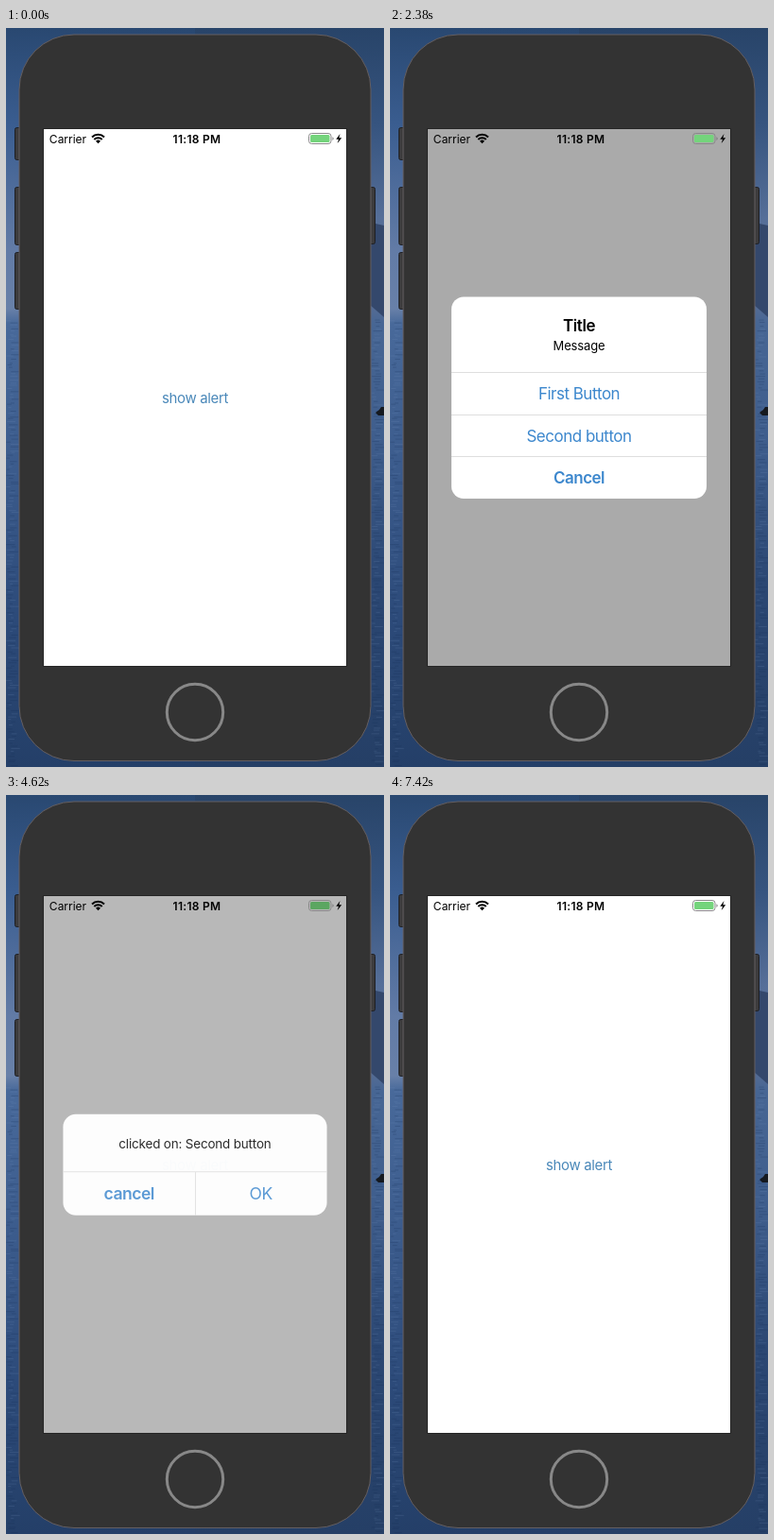
Recreate the animation shown at these times as an HTML page. Size 400 by 782 pixels, loop 7.49 s.

```html
<!DOCTYPE html>
<html lang="en">
<head>
<meta charset="utf-8">
<title>Alert demo</title>
<style>
  html, body { margin: 0; width: 100%; height: 100%; overflow: hidden; background: #333; }
  svg { display: block; width: 100vw; height: 100vh; }
  text { font-family: Inter, "Liberation Sans", sans-serif; text-anchor: middle; }
  .status { font-size: 12px; }
  .link { font-size: 15px; letter-spacing: -.36px; fill: #4a88b9; }
  .title { font-size: 17px; font-weight: 600; letter-spacing: -.4px; }
  .message { font-size: 13px; letter-spacing: -.16px; }
  .action { font-size: 17px; letter-spacing: -.5px; fill: #3c87cd; }
  .bold { font-weight: 600; }
  .rule { stroke: #dedede; stroke-width: 1; }
  .press { fill: #e9e9e9; }
  .key { fill: #3d3c3d; stroke: #1d1e22; }
</style>
</head>
<body>
<svg viewBox="0 0 400 782" preserveAspectRatio="none">
  <defs>
    <linearGradient id="left" x2="0" y2="1">
      <stop offset="0" stop-color="#294871"/>
      <stop offset=".13" stop-color="#3a5d90"/>
      <stop offset=".3" stop-color="#627ba6"/>
      <stop offset=".38" stop-color="#6880a8"/>
      <stop offset=".4" stop-color="#48699a"/>
      <stop offset=".6" stop-color="#3b5b8c"/>
      <stop offset=".8" stop-color="#2c4a79"/>
      <stop offset="1" stop-color="#243f68"/>
    </linearGradient>
    <linearGradient id="right" x2="0" y2="1">
      <stop offset="0" stop-color="#284469"/>
      <stop offset=".13" stop-color="#36547f"/>
      <stop offset=".26" stop-color="#566f99"/>
      <stop offset=".38" stop-color="#536b94"/>
      <stop offset=".4" stop-color="#476694"/>
      <stop offset=".55" stop-color="#3f5e8d"/>
      <stop offset=".75" stop-color="#2b4773"/>
      <stop offset="1" stop-color="#253f66"/>
    </linearGradient>
  </defs>

  <rect width="200" height="782" fill="url(#left)"/>
  <rect x="200" width="200" height="782" fill="url(#right)"/>
  <path d="M384 216L391 207L400 209V306L384 292Z" fill="#34486c"/>
  <g id="water"></g>
  <path d="M391 407L395 404L397 401H400V410H394Z" fill="#15191f"/>

  <g class="key">
    <rect x="9.5" y="105.5" width="8" height="34" rx="2"/>
    <rect x="9.5" y="168.5" width="8" height="61" rx="2"/>
    <rect x="9.5" y="237.5" width="8" height="60" rx="2"/>
    <rect x="382.5" y="168.5" width="8" height="60" rx="2"/>
  </g>
  <rect x="14" y="7" width="372" height="768.5" rx="58" fill="#333" stroke="#645f62"/>
  <circle cx="200" cy="724" r="29.7" fill="none" stroke="#888" stroke-width="3"/>
  <rect x="39.5" y="106.5" width="321" height="569" fill="#fff" stroke="#262626"/>

  <text id="link" class="link" x="200" y="396.5">show alert</text>
  <rect id="dim" x="40" y="107" width="320" height="568" opacity="0"/>

  <text class="status" x="65.5" y="121.5">Carrier</text>
  <text class="status bold" x="202" y="121.5" letter-spacing=".3">11:18 PM</text>
  <g fill="none" stroke="#000" stroke-width="2">
    <path d="M91 115.5A9.2 9.2 0 0 1 104 115.5"/>
    <path d="M93.3 118A5.9 5.9 0 0 1 101.7 118"/>
  </g>
  <path d="M97.5 122.2L95 119.7A3.6 3.6 0 0 1 100 119.7Z"/>
  <rect x="320.5" y="111.5" width="23.5" height="11" rx="3" fill="none" stroke="#898989"/>
  <path d="M345.5 115.3A2 2 0 0 1 345.5 118.9Z" fill="#777"/>
  <rect x="322" y="113" width="20.5" height="8" rx="1.5" fill="#74d47c"/>
  <rect id="shade" x="322" y="113" width="20.5" height="8" rx="1.5" opacity="0"/>
  <path d="M353.5 112L349.3 117.8H352L350.7 122L355.2 116.2H352.4Z"/>

  <g id="choice" opacity="0">
    <rect class="card" x="65" y="284.5" width="270" height="213.5" rx="13" fill="#fff"/>
    <g class="body">
      <rect class="press" x="65" y="409.5" width="270" height="44"/>
      <path class="rule" d="M65 364.5H335M65 409.5H335M65 453.5H335"/>
      <text class="title" x="200" y="320.5">Title</text>
      <text class="message" x="200" y="340.5">Message</text>
      <text class="action" x="200" y="393">First Button</text>
      <text class="action" x="200" y="437.5">Second button</text>
      <text class="action bold" x="200" y="482">Cancel</text>
    </g>
  </g>

  <g id="reply" opacity="0">
    <rect class="card" x="65" y="339.5" width="270" height="103.5" rx="13" fill="#fff"/>
    <g class="body">
      <path class="press" d="M200.5 399H335V430A13 13 0 0 1 322 443H200.5Z"/>
      <path class="rule" fill="none" d="M65 398.5H335M200.5 399V443"/>
      <text class="message" x="200" y="374.5">clicked on: Second button</text>
      <text class="action bold" x="132.5" y="427">cancel</text>
      <text class="action" x="267.3" y="427">OK</text>
    </g>
  </g>
</svg>

<script>
const LOOP = 7490, STEP = 70, OMEGA = 22.8, DIM = 0.333;
const $ = id => document.getElementById(id);
const set = (el, name, value) => el.setAttribute(name, value);
const clamp = x => Math.min(1, Math.max(0, x));

// Critically damped spring: share of the way still to go.
function remaining(ms) {
  if (ms <= 0) return 1;
  const x = OMEGA * ms / 1000;
  const r = (1 + x) * Math.exp(-x);
  return r < 0.003 ? 0 : r;
}

function makeAlert(id, show, press, hide) {
  const root = $(id);
  return {
    root, show, press, hide,
    card: root.querySelector('.card'),
    body: root.querySelector('.body'),
    row: root.querySelector('.press')
  };
}

const alerts = [
  makeAlert('choice', 1805, 3900, 4030),
  makeAlert('reply', 4479, 6210, 6340)
];

// Returns how present the alert is, from 0 to 1.
function drawAlert(a, t) {
  const left = remaining(t - a.show);
  const p = (1 - left) * remaining(t - a.hide);
  const scale = 1 + 0.2 * left;
  set(a.root, 'opacity', p > 0 ? 1 : 0);
  set(a.root, 'transform', `translate(200 391.2) scale(${scale}) translate(-200 -391.2)`);
  set(a.card, 'opacity', 1 - (1 - p) ** 2);
  set(a.body, 'opacity', p);
  set(a.row, 'opacity', t >= a.press ? 1 : 0);
  return p;
}

function linkOpacity(t) {
  const down = clamp((t - 1490) / 120);
  const up = clamp((t - 1800) / 250);
  return 1 - 0.8 * (down - up);
}

function drawWater() {
  let seed = 7;
  const rand = () => (seed = seed * 16807 % 2147483647) / 2147483647;
  let light = '', dark = '';
  for (let y = 308; y < 780; y += 3) {
    for (const x of [0, 386]) {
      const line = `M${x + rand() * 6} ${y + rand() * 2}h${3 + rand() * 7}`;
      if (rand() < 0.5) light += line; else dark += line;
    }
  }
  $('water').innerHTML =
    `<path d="${light}" stroke="#7d9ac4" opacity=".16"/>` +
    `<path d="${dark}" stroke="#122a50" opacity=".22"/>`;
}

function render(now) {
  const t = Math.floor(now % LOOP / STEP) * STEP;
  const [first, second] = alerts.map(a => drawAlert(a, t));
  set($('dim'), 'opacity', DIM * Math.max(first, second));
  set($('shade'), 'opacity', 0.26 * second);
  set($('link'), 'opacity', linkOpacity(t));
}

drawWater();
const start = performance.now();
function tick() {
  render(performance.now() - start);
  requestAnimationFrame(tick);
}
tick();
</script>
</body>
</html>
```
